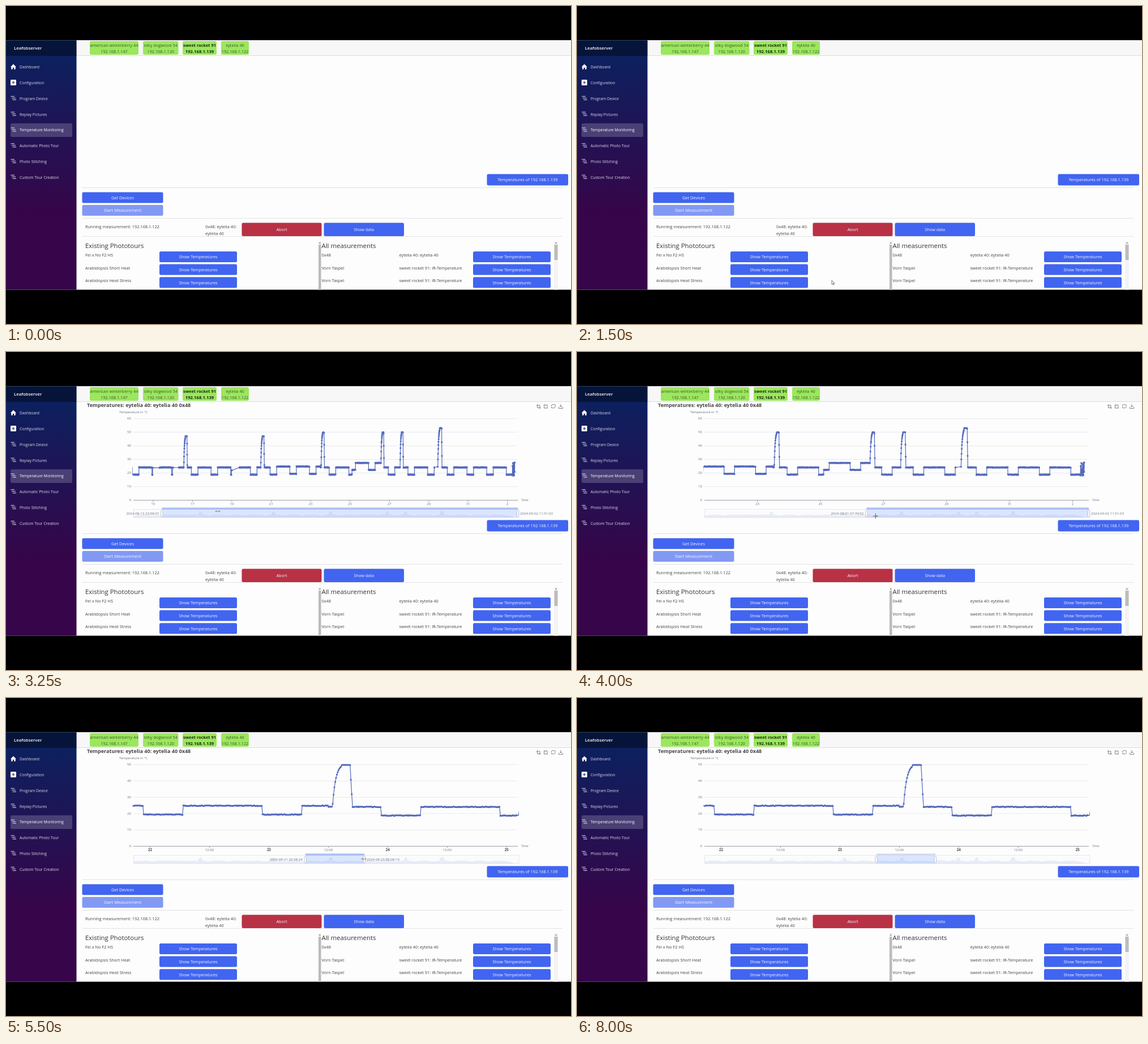
These frames come from a looping animation (998x561 px, 8.25 s). An HTML page:

```html
<!DOCTYPE html>
<html lang="en">
<head>
<meta charset="utf-8">
<title>Temperature monitoring</title>
<style>
  html, body { margin: 0; width: 100%; height: 100%; overflow: hidden; background: #000; }
  svg { display: block; width: 998px; height: 561px; font-family: "Open Sans", "Noto Sans", sans-serif; }
  text { white-space: pre; }
</style>
</head>
<body>
<svg id="stage" viewBox="0 0 998 561" xmlns="http://www.w3.org/2000/svg">
  <defs>
    <linearGradient id="side" x1="0" y1="0" x2="0" y2="1">
      <stop offset="0" stop-color="#082361"/>
      <stop offset=".7" stop-color="#370549"/>
    </linearGradient>
    <clipPath id="plot"><rect x="223" y="108" width="683" height="156"/></clipPath>
    <filter id="shade" x="-20%" y="-40%" width="140%" height="190%">
      <feDropShadow dx="1" dy="1.5" stdDeviation="2" flood-opacity=".25"/>
    </filter>
  </defs>
</svg>
<script>
const stage = document.getElementById('stage');
const BLUE = '#4165f0', LINE = '#5469bd', INK = '#444';

function add(parent, tag, attrs, content) {
  const el = document.createElementNS('http://www.w3.org/2000/svg', tag);
  for (const k in attrs) el.setAttribute(k, attrs[k]);
  if (content !== undefined) el.textContent = content;
  parent.append(el);
  return el;
}
const group = () => add(stage, 'g', {});
const box = (g, x, y, x2, y2, fill, more) =>
  add(g, 'rect', { x, y, width: x2 - x, height: y2 - y, fill, ...more });
const stroke = (g, d, color, width = 1, more) =>
  add(g, 'path', { d, fill: 'none', stroke: color, 'stroke-width': width, ...more });
// y is the vertical middle of the capitals
const label = (g, x, y, str, size = 7.4, fill = INK, more) =>
  add(g, 'text', { x, y: y + size * .36, 'font-size': size, fill, ...more }, str);
const MID = { 'text-anchor': 'middle' }, END = { 'text-anchor': 'end' };

function button(g, x, y, x2, y2, str, fill = BLUE) {
  box(g, x, y, x2, y2, fill, { rx: 2.5 });
  label(g, (x + x2) / 2, (y + y2) / 2 + .2, str, 7.35, '#f4f6ff', MID);
}

function drawPage(g) {
  box(g, 0, 60.5, 998, 500.5, '#fdfdfd');
  box(g, 124, 60.5, 998, 87.5, '#f7f7f7');
  stroke(g, 'M124 87.5H998', '#dcdcdc');
  drawSidebar(g);

  const chips = [
    [148, 234, 'american winterberry 44', 147], [242, 304.5, 'silky dogwood 54', 120],
    [312, 372, 'sweet rocket 91', 139, true], [380, 429, 'eytelia 40', 122]];
  for (const [x, x2, name, ip, bold] of chips) {
    const style = { ...MID, 'font-weight': bold ? 700 : 400 };
    const color = bold ? '#16290c' : '#3b5a26';
    box(g, x, 62, x2, 86, '#9be75d', { rx: 3 });
    label(g, (x + x2) / 2, 69, name, 7.4, color, style);
    label(g, (x + x2) / 2, 80.3, '192.168.1.' + ip, bold ? 7.7 : 7.3, color, style);
  }

  button(g, 849.5, 296.5, 993, 316.5, 'Temperatures of 192.168.1.139');
  stroke(g, 'M135 320.5H983M135 374.5H983M135 406.5H983', '#e2e2e2');
  button(g, 134.5, 328.5, 277.5, 347.5, 'Get Devices');
  button(g, 134.5, 351, 277.5, 370, 'Start Measurement', '#8299f4');
  label(g, 140, 389, 'Running measurement: 192.168.1.122');
  label(g, 352, 389, '0x48: eytelia 40:');
  label(g, 352, 401, 'eytelia 40');
  button(g, 416.5, 382.5, 557.5, 406, 'Abort', '#b83145');
  button(g, 561.5, 382.5, 703, 406, 'Show data');

  const head = { 'font-weight': 500 };
  label(g, 140, 422.5, 'Existing Phototours', 11.4, '#333', head);
  label(g, 557.5, 422.5, 'All measurements', 11.4, '#333', head);
  const rows = [
    ['Fei x No F2 HS', '0x48', 'eytelia 40: eytelia 40'],
    ['Arabidopsis Short Heat', 'Vorn Taspel', 'sweet rocket 91: IR-Temperature'],
    ['Arabidopsis Heat Stress', 'Vorn Taspel', 'sweet rocket 91: IR-Temperature']];
  rows.forEach(([tour, sensor, device], i) => {
    const y = 439.3 + i * 22.6, top = 433 + i * 22.6;
    label(g, 140, y, tour);
    label(g, 557.5, y, sensor);
    label(g, 694.5, y, device);
    button(g, 271, top, 408, top + 19, 'Show Temperatures');
    button(g, 825, top, 962, top + 19, 'Show Temperatures');
  });

  box(g, 551.5, 415, 557, 500.5, '#f3f3f3');
  box(g, 552, 421, 556.5, 500.5, '#bcbcbc');
  box(g, 968, 415, 975, 500.5, '#f3f3f3');
  box(g, 968.5, 421, 974.5, 448, '#bcbcbc');
  add(g, 'path', { d: 'M552.5 419l1.8-2.5 1.8 2.5zM969.7 419l1.8-2.5 1.8 2.5z', fill: '#8a8a8a' });
}

function drawSidebar(g) {
  box(g, 0, 60.5, 124.5, 500.5, 'url(#side)');
  box(g, 0, 60.5, 124.5, 88, 'rgba(0,0,0,.4)');
  label(g, 14, 74.3, 'Leafobserver', 7.8, '#fff', { 'font-weight': 600 });
  box(g, 8, 207, 117, 231, 'rgba(255,255,255,.19)', { rx: 2.5 });
  const items = ['Dashboard', 'Configuration', 'Program Device', 'Replay Pictures',
    'Temperature Monitoring', 'Automatic Photo Tour', 'Photo Stitching', 'Custom Tour Creation'];
  items.forEach((name, i) => {
    const y = 107.8 + i * 27.8;
    label(g, 24, y, name, 6.8, i === 4 ? '#fff' : '#dcd9e8');
    if (i > 1) stroke(g, `M8.5 ${y - 4}h6.5M10 ${y - 1}h7M11.5 ${y + 2}h6.5`, '#e8e6f0', 1);
  });
  add(g, 'path', { d: 'M8 107.5l5-5 5 5h-1.3v4.3h-2.5v-3h-2.4v3H9.3v-4.3z', fill: '#fff' });
  box(g, 8, 130, 18, 140, '#fff', { rx: 1.2 });
  stroke(g, 'M13 132.5v5M10.5 135h5', '#14184f', 1);
}

// Temperature by day of August (32 is the first of September)
const LAST = 33.493785;
const PEAKS = [[16.56, 16.72, 47], [20.47, 20.63, 47], [23.535, 23.683, 49.8],
  [26.575, 26.71, 50], [27.545, 27.69, 50], [29.46, 29.655, 53]];
const GAPS = [[14.99, 15.32], [16.02, 16.3], [19, 19.38], [29.3, 29.455]];
const inside = (d, a, b) => d > a && d < b;

function baseTemp(d) {
  const f = d % 1, lit = inside(f, .274, .941);
  if (inside(d, 25.105, 26.6)) return lit ? 27.4 : 22.3;
  if (inside(d, 14.975, 15.33) || inside(d, 15.985, 16.3)) return 24;
  if (inside(d, 18.98, 19.39)) return 22 + (d - 18.98) * 5;
  if (inside(d, 23.5, 23.6)) return 24.1;
  if (lit) return inside(d, 21.2, 23.6) ? 24.8 : 24.1;
  return inside(d, 21.9, 23.3) ? 19.4 : 18.8;
}

function temp(d, i) {
  if (d > 33.24) return 23 + 5 * Math.sin(i * 2.3) - (i % 13 === 0 ? 6 : 0);
  const base = baseTemp(d) + .2 * Math.sin(i * i * 1.7);
  for (const [from, to, top] of PEAKS) {
    if (!inside(d, from, to + .02)) continue;
    const u = (d - from) / (to - from);
    const rise = u < .5 ? 1.03 * (1 - Math.exp(-5.5 * u)) : 1;
    return base + (top - base) * (u > 1 ? 1 - (d - to) / .02 : Math.min(1, rise));
  }
  return base;
}

const samples = [];
for (let i = 0, d; (d = 12.44 + i / 144) < 33.375; i++)
  if (!GAPS.some(([a, b]) => inside(d, a, b))) samples.push([d, temp(d, i)]);

const sliderX = d => 904 - (LAST - d) * 32.25;
const sliderDay = x => LAST - (904 - x) / 32.25;
const stamp = d => new Date(Date.UTC(2024, 7, 1) + Math.round((d - 1) * 86400) * 1000)
  .toISOString().replace('T', ' ').slice(0, 19);

const shadowPath = (() => {
  let p = 'M226 291.5';
  for (const [d, v] of samples.filter((s, i) => i % 6 === 0 && s[0] > 13.1 && s[0] < 33.2))
    p += `L${(343 + (d - 16.65) * 33.05).toFixed(1)} ${(293.5 - v * .235).toFixed(1)}`;
  return p + 'L896 291.5z';
})();

function drawChart(g, from, to, dragging) {
  const px = d => 225 + (d - from) / (to - from) * 678;
  const max = to > 29.47 ? 60 : 50;
  const py = v => 261.5 - v / max * 144;
  const axis = '#6e7079';

  label(g, 143, 94, 'Temperatures: eytelia 40: eytelia 40 0x48', 9.1, '#464646', { 'font-weight': 700 });
  label(g, 225, 106, 'Temperature in °C', 5.9, axis, MID);
  label(g, 910, 261, 'Time', 6, axis, { 'font-style': 'italic' });
  stroke(g, 'M938.5 92.5v6h6M937 94h6v6M950.5 92.5v6.500h6.500M951 93.500h5v5M963 96a3.700 3.700 0 0 1 7-1.500v-2M970.500 95.500a3.700 3.700 0 0 1-7 1.500v2M980 92v5M978 95l2 2 2-2M976.500 97v2.500h7v-2.500', '#777', .9);

  for (let v = 0; v <= max; v += 10) {
    if (v) stroke(g, `M225 ${py(v)}H904`, '#e9eaf0');
    label(g, 221, py(v) - .5, v, 6.1, axis, END);
  }
  stroke(g, 'M225 261.5H904', '#9b9ea8');

  const span = to - from, step = span > 10 ? 2 : span > 5 ? 1 : .5;
  const first = step === 2 ? Math.ceil((from - 1) / 2) * 2 + 1 : Math.ceil(from / step) * step;
  for (let d = first; d <= to; d += step) {
    const noon = d % 1, name = noon ? '12:00' : d === 32 ? 'Sep' : d > 32 ? d - 31 : d;
    const bold = d === 32 || (step === .5 && !noon);
    stroke(g, `M${px(d)} 261.5v3`, '#9b9ea8');
    label(g, px(d), 268, name, 6.1, bold ? '#464646' : axis, { ...MID, 'font-weight': bold ? 700 : 400 });
  }

  let line = '', dots = '';
  for (const [d, v] of samples) {
    if (d < from - .1 || d > to + .1) continue;
    const at = px(d).toFixed(1) + ' ' + py(v).toFixed(1);
    line += (line ? 'L' : 'M') + at;
    if (inside(d, from, to)) dots += `M${at}h.01`;
  }
  const clip = { 'clip-path': 'url(#plot)' };
  stroke(g, line, LINE, 1.2, { ...clip, 'stroke-linejoin': 'round' });
  stroke(g, dots, LINE, 3.2, { ...clip, 'stroke-linecap': 'round' });

  const a = sliderX(from), b = sliderX(to);
  box(g, 225.5, 277.5, 906, 292, '#fbfbfd', { stroke: '#dfe3ee', 'stroke-width': .8 });
  add(g, 'path', { d: shadowPath, fill: '#e9edf6', stroke: '#d5dcec', 'stroke-width': .6 });
  box(g, a, 277.5, b, 292, 'rgba(135,170,250,.27)');
  box(g, a, 274.5, b, 278, dragging ? '#a9bff5' : '#d2dbee');
  for (const x of [a, b])
    box(g, x - 1.7, 279.5, x + 1.7, 290.5, '#fff', { rx: 1, stroke: '#acb8d1', 'stroke-width': .8 });
  if (dragging) {
    label(g, a - 5, 284.7, stamp(from), 6.15, axis, END);
    label(g, b + 4, 284.7, stamp(to), 6.15, axis);
  }
}

function drawTooltip(g) {
  stroke(g, 'M603 118V261', '#c9ccd6', .8, { 'stroke-dasharray': '2 2' });
  add(g, 'circle', { cx: 603, cy: 118, r: 2.4, fill: '#fff', stroke: LINE, 'stroke-width': 1.2 });
  box(g, 611.5, 186.5, 733.5, 216.5, '#fff', { rx: 2, stroke: '#d5d9e6', 'stroke-width': .8, filter: 'url(#shade)' });
  label(g, 616.5, 195.5, 'eytelia 40: eytelia 40 0x48: 49,8°C', 7.2, '#666');
  label(g, 616.5, 206, '8/23/2024, 3:41:50 PM', 7.2, '#666');
}

const POINTERS = {
  arrow: ['M0 0v7l1.700-1.500 1.100 2.500 1.100-.5-1.100-2.400h2.300z', '#555', .8, '#fff'],
  resize: ['M-4 0h8M-2.500-1.500l-1.500 1.500 1.500 1.500M2.500-1.500l1.500 1.500-1.500 1.500', '#777', .9, 'none'],
  cross: ['M-4.500 0h9M0-4.500v9', '#55664a', 1, 'none']
};
function drawPointer(g, kind, x, y) {
  const [d, color, width, fill] = POINTERS[kind];
  stroke(g, d, color, width, { transform: `translate(${x} ${y})`, fill });
}

// [time, pointer, x, y, range start, range end, tooltip]
const A = 12.44, B = 21.871516, C = 21.86, D = 25.089;
const STEPS = [
  [0],
  [1500, 'arrow', 450, 484],
  [1750, 'arrow', 560, 425],
  [2000, 'arrow', 630, 395],
  [2250, 'arrow', 632, 395, A, LAST],
  [2500, 'arrow', 440, 335, A, LAST],
  [2750, 'resize', 226, 284, A, LAST],
  [3000, 'resize', 262, 282, sliderDay(232), LAST],
  [3250, 'resize', 374, 281, 13.998692, LAST],
  [3500, 'resize', 480, 283, sliderDay(400), LAST],
  [3750, 'resize', 522, 287, sliderDay(494), LAST],
  [4000, 'cross', 527.5, 289.5, 21.319352, LAST],
  [4250, 'resize', 720, 285, B, LAST],
  [4500, 'resize', 880, 283, B, sliderDay(892)],
  [4750, 'resize', 780, 281, B, 30.740845],
  [5000, 'resize', 690, 282, B, sliderDay(722)],
  [5250, 'resize', 640, 283, B, sliderDay(654)],
  [5500, 'resize', 632, 284, C, D],
  [5750, 'arrow', 626, 258, C, D],
  [6000, 'arrow', 615, 215, C, D],
  [6250, 'arrow', 608, 185, C, D],
  [6500, 'arrow', 606, 174, C, D, true],
  [7500, 'arrow', 690, 245, C, D],
  [7750, '', 0, 0, C, D]
];

drawPage(group());
const live = group();
let shown = null;

function frame(now) {
  const t = now % 8250;
  const step = STEPS.findLast(s => s[0] <= t) || STEPS[0];
  if (step !== shown) {
    shown = step;
    const [, pointer, x, y, from, to, tip] = step;
    live.replaceChildren();
    if (to) drawChart(live, from, to, inside(step[0], 2700, 5600));
    if (tip) drawTooltip(live);
    if (pointer) drawPointer(live, pointer, x, y);
  }
  requestAnimationFrame(() => frame(performance.now()));
}
frame(performance.now());
</script>
</body>
</html>
```
